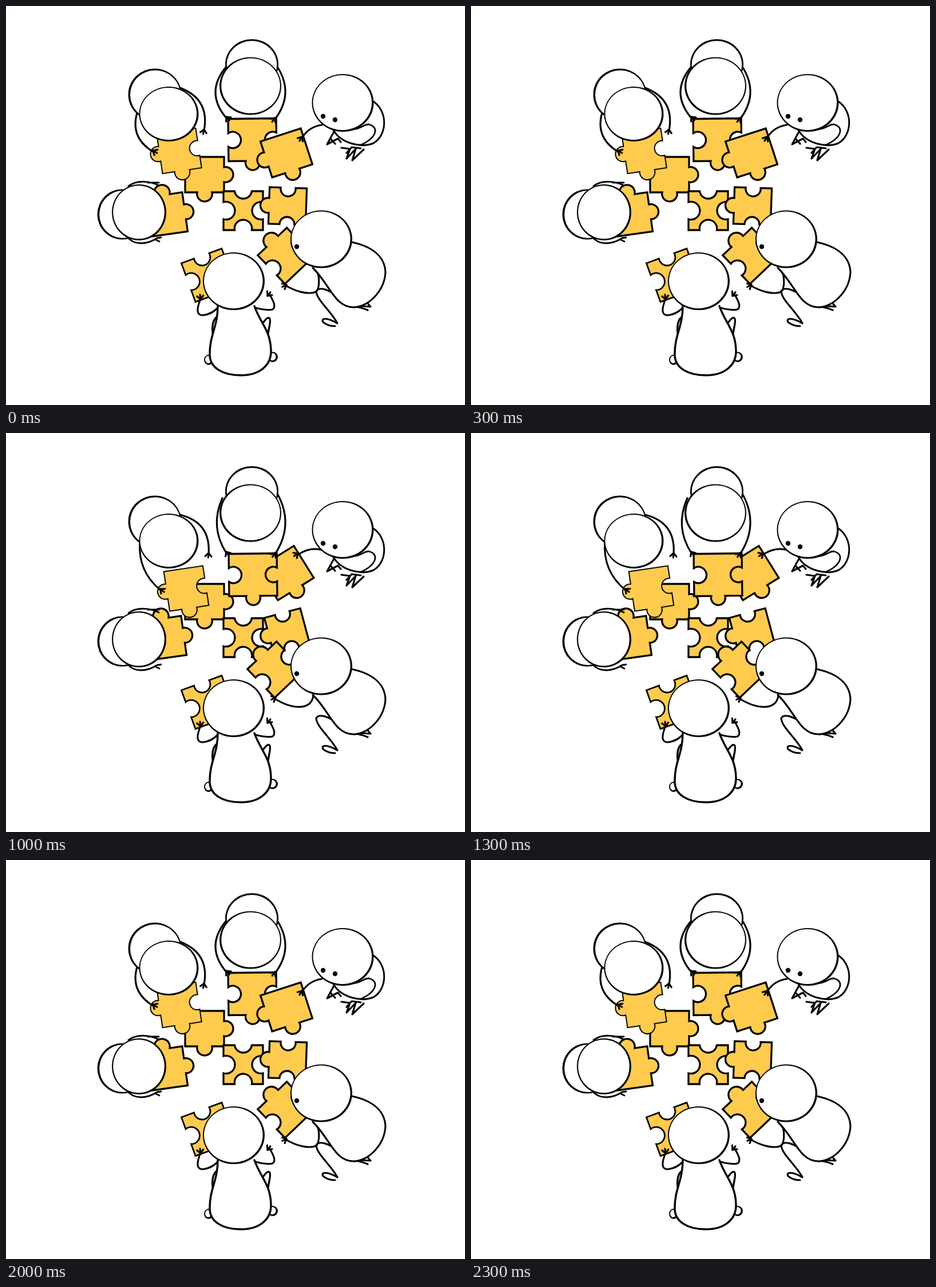
These frames come from a looping animation (802 px wide and 698 px high, 2.5 s). An HTML page with a canvas:

```html
<!DOCTYPE html>
<html lang="en">
<head>
<meta charset="utf-8">
<title>Puzzle team</title>
<style>
  html, body { margin: 0; width: 100%; height: 100%; overflow: hidden; background: #fff; }
  canvas { display: block; }
</style>
</head>
<body>
<canvas id="stage" width="802" height="698"></canvas>
<script>
const ctx = document.getElementById('stage').getContext('2d');
const INK = '#050505', ORANGE = '#fecb4f';
const STEP = 500, STEPS = 5;

function line(d, width = 3.2, fill = 'transparent') {
  const path = new Path2D(d);
  ctx.fillStyle = fill;
  ctx.fill(path);
  ctx.lineWidth = width;
  ctx.strokeStyle = INK;
  ctx.stroke(path);
}

function oval(x, y, rx, ry, color) {
  ctx.beginPath();
  ctx.ellipse(x, y, rx, ry, 0, 0, Math.PI * 2);
  ctx.fillStyle = color;
  ctx.fill();
}

// White ball whose outline is heavier on the side away from (dx, dy).
function ball(x, y, rx, ry, dx = -0.7, dy = -0.5) {
  oval(x, y, rx, ry, INK);
  oval(x + dx, y + dy, rx - 2.7, ry - 2.5, '#fff');
}

const head = (x, y, dx, dy) => ball(x, y, 54, 50.5, dx, dy);
const eye = (x, y) => oval(x, y, 4.2, 4.2, INK);

function hand(x, y, angle) {
  for (const spread of [-0.75, 0, 0.75]) {
    const a = angle + spread;
    line(`M${x} ${y}l${8 * Math.cos(a)} ${8 * Math.sin(a)}`, 3.2);
  }
}

// Curved arm that bulges by `bow` from its chord and ends in a hand.
function arm(x1, y1, x2, y2, bow) {
  const k = 2 * bow / Math.hypot(x2 - x1, y2 - y1);
  const cx = (x1 + x2) / 2 + (y2 - y1) * k;
  const cy = (y1 + y2) / 2 - (x2 - x1) * k;
  line(`M${x1} ${y1}Q${cx} ${cy} ${x2} ${y2}`);
  hand(x2, y2 - 2, Math.atan2(y2 - cy, x2 - cx));
}

// Jigsaw piece: depths go clockwise from the top; > 0 is a knob, < 0 a socket.
function piece(x, y, w, h, degrees, depths, half = 13, width = 3.3) {
  ctx.save();
  ctx.translate(x, y);
  ctx.rotate(degrees * Math.PI / 180);
  ctx.beginPath();
  depths.forEach((depth, i) => {
    const turn = new DOMMatrix().rotate(90 * i);
    const [along, out] = i % 2 ? [h, w] : [w, h];
    const bulge = Math.abs(depth);
    const r = (half * half + bulge * bulge) / (2 * bulge || 1);
    const lift = Math.sign(depth) * (bulge - r);
    const edge = new Path2D();
    const center = turn.transformPoint({ x: 0, y: -out / 2 - lift });
    const a = Math.atan2(lift, -half) + i * Math.PI / 2;
    const b = Math.atan2(lift, half) + i * Math.PI / 2;
    const start = turn.transformPoint({ x: -along / 2, y: -out / 2 });
    ctx.lineTo(start.x, start.y);
    if (depth) ctx.arc(center.x, center.y, r, a, b, depth < 0);
  });
  ctx.closePath();
  ctx.fillStyle = ORANGE;
  ctx.fill();
  ctx.strokeStyle = INK;
  ctx.lineWidth = width;
  ctx.stroke();
  ctx.restore();
}

// near: pieces pushed inwards; far: the second, wider swing of that push.
function drawPieces(near, far) {
  piece(347, 295, 68, 62, 0, [0, 16, 16, 0]);
  piece(302.5 + 12.5 * near, 253.5 + 18.5 * near, 69, 70, -8.5, [0, -16, 16, 16], 13, 2);
  piece(278 + 19 * near - 21 * far, 365 - 18 * near + 12 * far, 70, 69, -8, [18, 15, 0, 0]);

  const top = () => piece(430.5 + near, 234 + 14 * near, 84, 74, -0.7, [0, -20, 16, -22], 12);
  const corner = () => piece(490 + 12 * near - 13 * far, 257 + 13 * near - 25 * far,
    74, 66, -18 - 14 * near, [0, 0, 16, 16]);
  (far ? [corner, top] : [top, corner]).forEach(draw => draw());

  piece(414.5, 358, 69, 68, 0, [-13, -19, -18, -20], 15);
  piece(492 - far, 350 - 4 * far, 65, 64, 2 - 17 * far, [-15, 0, -13, 15]);
  piece(489 - 18 * near, 437 - 23 * near, 70, 69, -43.5, [16, -16, 0, -17], 14);
  piece(354, 471, 75, 72, -20, [-17, 0, 0, -20], 14, 2.8);
}

function drawLeftTop(near) {
  arm(231 + 3 * near, 181 + 9 * near, 257 + 13 * near, 255 + 20 * near, -16 + 4 * near);
  arm(304, 143, 346 + 8 * near, 218 - 6 * near, 18);
  ball(260, 155, 46.5, 45.5, 0.8, 0.4);
  ball(284.5, 189, 52, 48);
}

function drawTop(near) {
  arm(385 - 7 * near, 106 + 8 * near, 385, 196 + 14 * near, -19 + 6 * near);
  arm(474, 106, 470, 198 + 14 * near, 16);
  ball(429.5, 102, 46.5, 44, 0, 0.6);
  head(427, 140, 0.6, -0.4);
}

function drawRightTop(near, far) {
  line('M642 167C668 185 666 226 642 240C620 249 585 240 572 217', 3, '#fff');
  line('M605 216C625 214 623 207 634 207C653 212 647 231 620 243', 2.8);
  line('M573 220L561 242L580 232L585 238M567 232L575 241');
  line('M586 248L601 250L595 267L611 250L605 270L625 251M595 257L604 247L620 249');
  if (far) arm(572, 215, 510, 213, -11);
  else arm(552, 208, 517 + 6 * near, 231 + 7 * near, -5);
  head(588.5, 169.5);
  eye(554, 193);
  eye(575, 199);
}

function drawLeft() {
  line('M214 315C229 304 252 306 267 314M248 309L267 309', 3);
  line('M211 403C225 421 249 416 264 406L271 405M260 408L268 412', 2.8);
  ball(203, 364.5, 43.5, 44, 1, 0);
  ball(232.5, 361, 47.5, 49, -0.5, -0.3);
}

function drawRightLow(near) {
  line('M587 515C566 494 546 491 542 499C543 514 564 530 578 553');
  line('M579 555C560 544 550 546 554 553C560 558 567 560 575 560');
  line('M600 525C616 526 625 529 632 532M618 525L637 526L630 518');
  if (near) line('M537 459C534 485 502 485 468 464');
  else line('M541 458C551 478 546 496 542 500C528 506 505 499 487 488');
  hand(490 - 19 * near, 488 - 25 * near, 2.7);
  line('M604 413C641 421 662 439 663 466C661 501 630 528 607 527C574 527 566 487 536 458', 3.2, '#fff');
  head(551, 408);
  eye(508, 421);
}

function drawBottom() {
  line('M340 512C333 530 332 541 344 541C354 540 364 534 370 528');
  line('M460 504C469 518 472 528 465 531C455 533 444 530 436 528');
  line('M367 545C360 552 359 566 363 580M450 553C458 542 463 543 461 556L457 578', 3.4);
  ball(354, 619, 8, 9);
  ball(466, 614, 9, 9);
  line('M370 525C370 561 356 575 356 608C355 633 379 646 410 646C444 646 464 628 463 602C462 567 444 554 434 525', 3.5, '#fff');
  head(398, 481.5);
  hand(340, 513, -1.7);
  hand(457, 507, -0.9);
}

function draw(pose) {
  const near = Math.min(pose, 1), far = pose - near;
  ctx.fillStyle = '#fff';
  ctx.fillRect(0, 0, 802, 698);
  ctx.lineCap = 'round';
  ctx.lineJoin = 'miter';
  drawPieces(near, far);
  ctx.lineJoin = 'round';
  drawLeftTop(near);
  drawTop(near);
  drawRightTop(near, far);
  drawLeft();
  drawRightLow(near);
  drawBottom();
}

// Poses run there and back: 0 1 2 1 0.
function tick() {
  const step = Math.floor(performance.now() / STEP) % STEPS;
  draw(Math.min(step, STEPS - 1 - step));
  requestAnimationFrame(tick);
}
tick();
</script>
</body>
</html>
```
